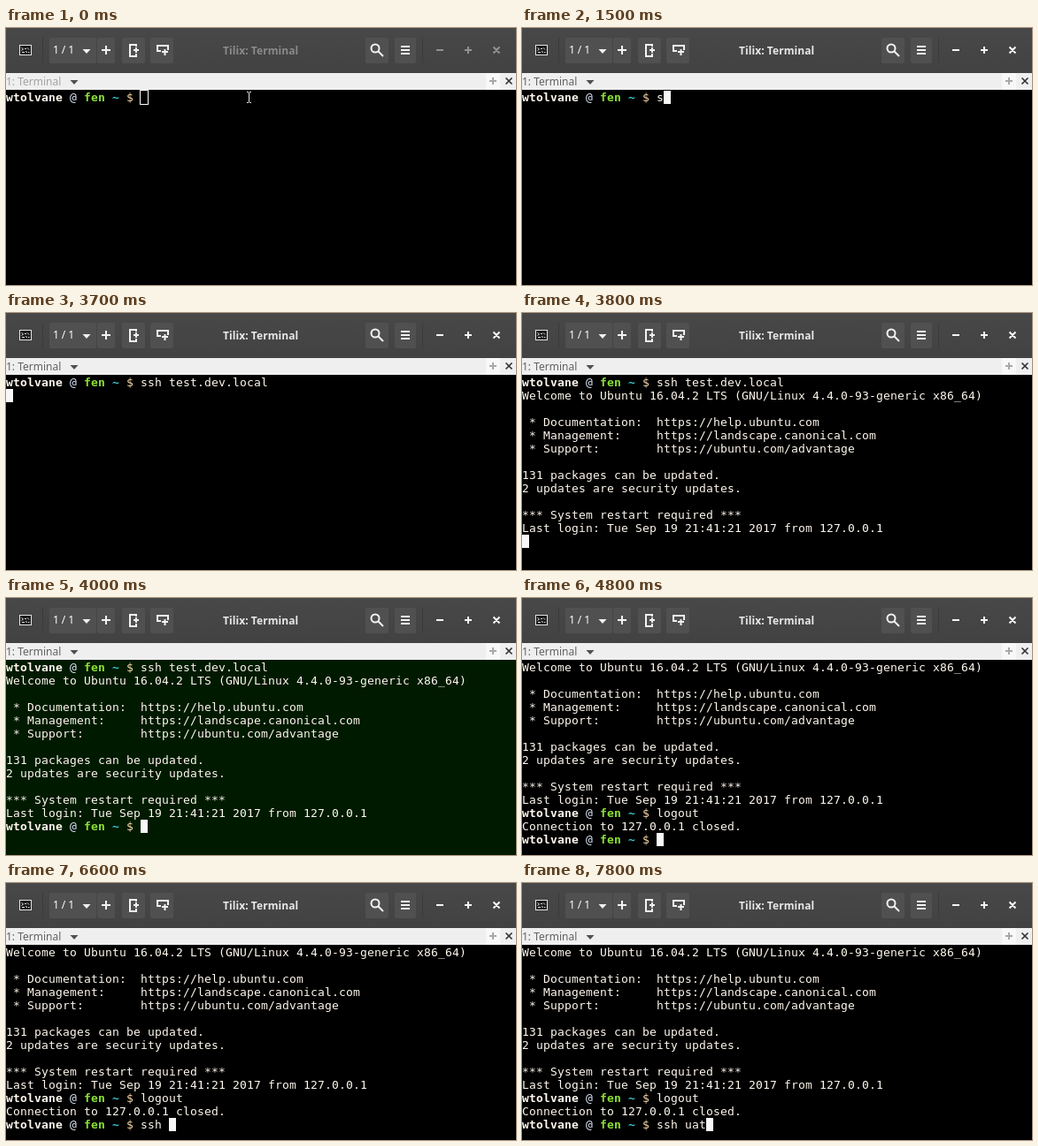
An HTML page that plays this animation: 576x291 px, repeating every 8000 ms.

```html
<!DOCTYPE html>
<html lang="en">
<head>
<meta charset="utf-8">
<title>Terminal session</title>
<style>
  html, body { margin: 0; width: 100%; height: 100%; overflow: hidden; background: #000; }
  svg { display: block; width: 100vw; height: 100vh; }
  text { white-space: pre; }
  .ui { font: 12px "Noto Sans", sans-serif; }
  .term { font: 13px "DejaVu Sans Mono", monospace; fill: #fff8ee; }
  .b { font-weight: bold; }
  .btn { fill: #505050; }
  .ico { fill: none; stroke: #f2f2f2; stroke-width: 2; }
</style>
</head>
<body>
<svg viewBox="0 0 576 291">
  <defs>
    <linearGradient id="bar" x2="0" y2="1">
      <stop offset="0" stop-color="#484848"/>
      <stop offset="1" stop-color="#424242"/>
    </linearGradient>
  </defs>
  <rect width="576" height="291"/>

  <!-- header bar -->
  <rect width="576" height="51" fill="url(#bar)"/>
  <path d="M41.5 11V40M470.5 11V40" stroke="#3b3b3b"/>
  <g class="btn">
    <rect x="49" y="11" width="53" height="29" rx="2"/>
    <rect x="103" y="11" width="20" height="29" rx="2"/>
    <rect x="131" y="11" width="26" height="29" rx="2"/>
    <rect x="163" y="11" width="26" height="29" rx="2"/>
    <rect x="406" y="11" width="26" height="29" rx="2"/>
    <rect x="439" y="11" width="24" height="29" rx="2"/>
  </g>
  <rect x="15.5" y="19.5" width="13" height="11" fill="#1c1c1c" stroke="#e4e4e4"/>
  <path d="M17.5 22.5l2 1.5l-2 1.5M21 23.5h2M24 22.5l2 2M18 27.5h3M22 26.5l2 1M25 27.5h1.5" fill="none" stroke="#ddd"/>
  <text class="ui" x="53" y="29" fill="#fff" letter-spacing="-.1">1 / 1</text>
  <path d="M86.500 24h9l-4.500 5z" fill="#f0f0f0"/>
  <path class="ico" d="M108 25h10M113 20v10"/>
  <path class="ico" d="M147 21v-2h-7v13h7v-3M144 25h6M147 22v6"/>
  <path class="ico" d="M175 26h-4v-6h12v5M176 27h7M179.500 24v7"/>
  <circle class="ico" cx="417" cy="23" r="4.500"/>
  <path class="ico" d="M420 26l6 6"/>
  <path class="ico" d="M446 21h10M446 25h10M446 29h10"/>
  <text id="title" class="ui b" x="245" y="30" letter-spacing=".06">Tilix: Terminal</text>
  <path id="controls" d="M486 25h8M518 25h8M522 21v8M550.500 21.500l7 7M557.500 21.500l-7 7" fill="none" stroke-width="2"/>

  <!-- tab bar -->
  <rect y="51" width="576" height="19" fill="#efefef"/>
  <rect x="542" y="51" width="16" height="19" fill="#f8f8f8"/>
  <text id="tab" class="ui" x="0" y="65">1: Terminal</text>
  <path d="M72.500 59h9l-4.500 5z" fill="#505050"/>
  <path d="M546 60h8M550 56v8" stroke="#a8a8a8" stroke-width="2"/>
  <path d="M564.500 56.500l7 7M571.500 56.500l-7 7" stroke="#333" stroke-width="1.700"/>

  <!-- terminal -->
  <rect id="bg" y="70" width="576" height="221"/>
  <rect id="cursor"/>
  <g id="rows" class="term"></g>
  <path id="mouse" d="M272 72.500h2M275 72.500h2M274.500 73v11M272 84.500h2M275 84.500h2" stroke="#e8e8e8"/>
</svg>
<script>
const LOOP = 8000, CELL = 8, LINE = 15, TOP = 71, COLS = 72, PROMPT_LEN = 19;
const $ = id => document.getElementById(id);

// every character sits in its own terminal cell
const GRID = Array.from({ length: COLS }, (_, i) => i * CELL).join(' ');

const PROMPT = '<tspan class="b">wtolvane</tspan> <tspan fill="#e4eeff">@</tspan> ' +
  '<tspan class="b" fill="#8ae234">fen</tspan> <tspan class="b" fill="#34c8d2">~</tspan> ' +
  '<tspan fill="#fddcae">$</tspan> ';

const MOTD = [
  'Welcome to Ubuntu 16.04.2 LTS (GNU/Linux 4.4.0-93-generic x86_64)',
  '',
  ' * Documentation:  https://help.ubuntu.com',
  ' * Management:     https://landscape.canonical.com',
  ' * Support:        https://ubuntu.com/advantage',
  '',
  '131 packages can be updated.',
  '2 updates are security updates.',
  '',
  '*** System restart required ***',
  'Last login: Tue Sep 19 21:41:21 2017 from 127.0.0.1'
];

// [time, typed command]
const FIRST = [
  [0, ''], [1500, 's'], [1600, 'ss'], [1700, 'ssh'], [1800, 'ssh '], [1900, 'ssh t'],
  [2200, 'ssh '], [2300, 'ssh te'], [2500, 'ssh tes'], [2600, 'ssh test'],
  [2700, 'ssh test.'], [2800, 'ssh test.d'], [2900, 'ssh test.de'],
  [3100, 'ssh test.dev.'], [3300, 'ssh test.dev.l'], [3400, 'ssh test.dev.lo'],
  [3500, 'ssh test.dev.loc'], [3600, 'ssh test.dev.local']
];
const SECOND = [
  [4800, ''], [5100, 's'], [5300, 'ss'], [5400, 'ssh'], [5500, 'ssh '],
  [7200, 'ssh u'], [7300, 'ssh ua'], [7400, 'ssh uar'], [7800, 'ssh uat']
];

const at = (keys, t) => keys.filter(k => k[0] <= t).pop()[1];
const cmd = text => ({ prompt: true, text });
const out = text => ({ prompt: false, text });

function screen(t) {
  if (t >= 4800) {
    return [...MOTD.map(out), cmd('logout'), out('Connection to 127.0.0.1 closed.'), cmd(at(SECOND, t))];
  }
  const lines = [cmd(at(FIRST, t))];
  if (t >= 3800) lines.push(...MOTD.map(out));
  if (t >= 3700) lines.push(t >= 3900 ? cmd('') : out(''));
  return lines;
}

const lerp = (a, b, k) => Math.round(a + (b - a) * k);
const grey = (a, b, k) => { const v = lerp(a, b, k); return `rgb(${v},${v},${v})`; };

function set(el, attrs) {
  for (const name in attrs) el.setAttribute(name, attrs[name]);
}

function drawCursor(t, line, row) {
  const x = ((line.prompt ? PROMPT_LEN : 0) + line.text.length) * CELL;
  const y = TOP + row * LINE;
  if (t < 600) {
    set($('cursor'), { x: x - .5, y: y - .5, width: 9, height: 16, fill: 'none', stroke: '#fff' });
    return;
  }
  const off = (t >= 1200 && t < 1500) || (t >= 6000 && t < 6600);
  set($('cursor'), { x, y, width: CELL, height: LINE, fill: off ? 'none' : '#f8f8f8', stroke: 'none' });
}

function draw(t) {
  const fade = at([[0, 0], [600, .3], [700, .65], [800, .9], [900, 1]], t);
  set($('title'), { fill: grey(138, 232, fade) });
  set($('controls'), { stroke: grey(146, 245, fade) });
  set($('tab'), { fill: grey(163, 98, fade) });
  set($('mouse'), { visibility: t < 600 ? 'visible' : 'hidden' });
  set($('bg'), { fill: t >= 4000 && t < 4800 ? '#001a00' : '#000' });

  const lines = screen(t);
  $('rows').innerHTML = lines.map((l, i) =>
    `<text x="${GRID}" y="${TOP + 12 + i * LINE}">${l.prompt ? PROMPT : ''}${l.text}</text>`).join('');
  drawCursor(t, lines[lines.length - 1], lines.length - 1);
}

const start = performance.now();
let last = -1;
function tick() {
  const t = Math.floor((performance.now() - start) % LOOP / 100) * 100;
  if (t !== last) draw(last = t);
  requestAnimationFrame(tick);
}
tick();
</script>
</body>
</html>
```
